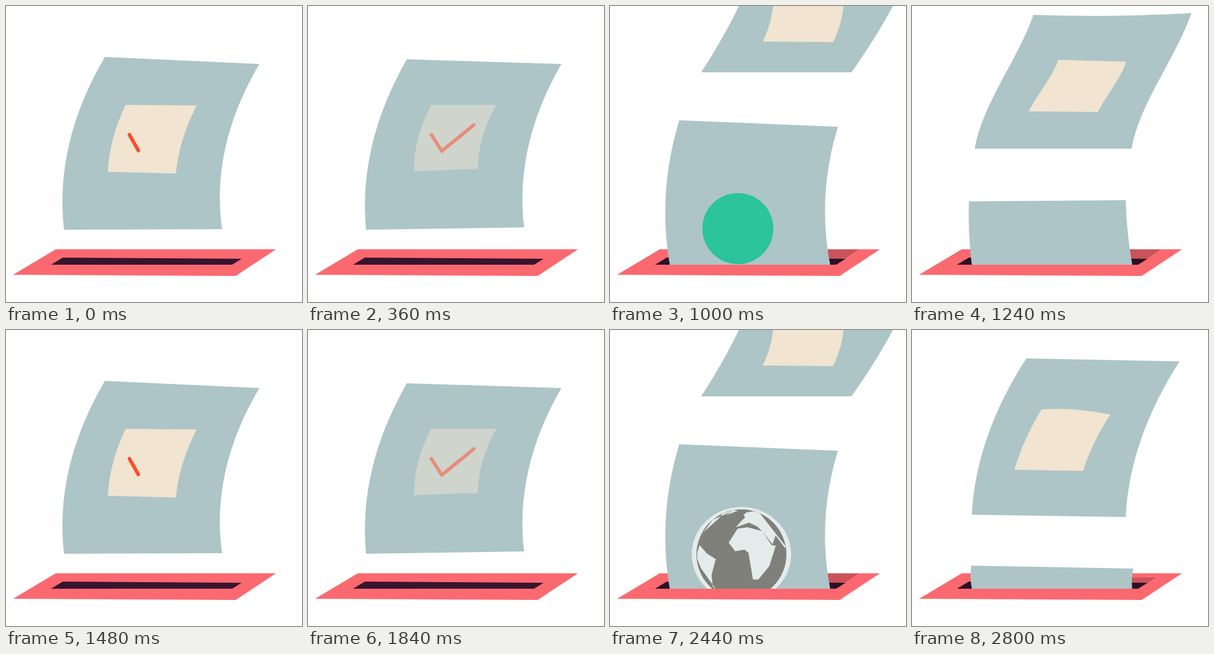
Write an HTML page with a canvas that moves like this. It is 500 by 500 pixels and loops after 2920 ms.

```html
<!DOCTYPE html>
<html lang="en">
<head>
<meta charset="utf-8">
<title>Ballots dropping into a slot</title>
<style>
html, body { margin: 0; height: 100%; overflow: hidden; background: #fff; }
canvas { display: block; width: 100vmin; height: 100vmin; }
</style>
</head>
<body>
<canvas id="stage" width="500" height="500"></canvas>
<script>
const ctx = document.getElementById('stage').getContext('2d');
const LOOP = 2920;
const COLORS = {
  paper: '#adc5c7', square: '#f1e4d1', check: '#fb4b2e', tray: '#fb6970',
  slot: '#38142f', light: '#e3eceb', ocean: '#7f8079', emblem: '#2bc49b'
};

// The drawing moves in held poses; twelve poses make one ballot.
const STARTS = [0, 120, 240, 360, 520, 600, 760, 880, 1000, 1120, 1240, 1360,
  1480, 1600, 1720, 1840, 1960, 2040, 2200, 2320, 2440, 2560, 2680, 2800];

function fill(path, color) {
  ctx.fillStyle = color;
  ctx.fill(new Path2D(path));
}

function ellipse(x, y, rx, ry, color) {
  ctx.fillStyle = color;
  ctx.beginPath();
  ctx.ellipse(x, y, rx, ry, 0, 0, 2 * Math.PI);
  ctx.fill();
}

// A sheet is four corners (clockwise from top left), the sideways bow of its
// sides, the bow of its top edge and an S-bend of its sides.
function drawSheet([ax, ay, bx, by, cx, cy, dx, dy, bow = 0, top = 0, bend = 0], color) {
  const third = (a, b) => a + (b - a) / 3;
  const upper = bow * 2 / 3 + bend, lower = bow * 2 / 3 - bend;
  fill(`M${ax},${ay} Q${(ax + bx) / 2},${(ay + by) / 2 + top} ${bx},${by}
    C${third(bx, cx) + upper},${third(by, cy)} ${third(cx, bx) + lower},${third(cy, by)} ${cx},${cy}
    L${dx},${dy}
    C${third(dx, ax) + lower},${third(dy, ay)} ${third(ax, dx) + upper},${third(ay, dy)} ${ax},${ay}Z`, color);
}

const mix = (a, b, t) => a.map((n, i) => n + (b[i] - n) * t);

// Ballot entering the slot: top corners, bows.
function enteringSheet(pose) {
  const slotEdge = [372, 437, 101, 437];
  switch (pose) {
    case 7: return [154, 109, 416, 118, 369, 408, 101, 410, -44, -9];
    case 8: return [135, 149, 401, 159, ...slotEdge, -38, -4];
    case 9: return [117, 193, 385, 204, ...slotEdge, -29];
    case 10: return [102, 261, 371, 265, ...slotEdge, -15];
    case 11: return [96, 330, 361, 328, ...slotEdge, -4];
    case 0: return [100, 398, 374, 403, ...slotEdge, -3];
  }
}

// Ballot coming down behind it, with its blank square.
function arrivingSheets(pose) {
  switch (pose) {
    case 7: return [[217, -24, 489, -24, 471, 24, 204, 17]];
    case 8: return [
      [235, -90, 505, -90, 438, 66, 180, 63],
      [290, -60, 405, -60, 398, 8, 280, 7]];
    case 9: return [
      [240, -50, 503, -50, 408, 112, 154, 112, 10],
      [276, -10, 395, -10, 377, 61, 258, 60, 8]];
    case 10: return [
      [232, -25, 502, -25, 388, 178, 128, 177],
      [264, 39, 380, 41, 342, 120, 225, 119]];
    case 11: return [
      [205, 15, 472, 12, 371, 241, 106, 241, -10, 6, 14],
      [247, 91, 362, 94, 314, 179, 197, 178, 4, 0, 4]];
    case 0: return [
      [193, 48, 452, 53, 361, 316, 101, 312, -39],
      [219, 134, 335, 143, 289, 238, 173, 236, -8, -8]];
  }
}

function drawGlobe(cx, cy, centreLon) {
  const radius = 76, rad = Math.PI / 180;
  // Coastlines as longitude, latitude pairs.
  const southAmerica = [-80, 2, -72, 12, -50, 1, -35, -6, -48, -27, -65, -45, -69, -55, -71, -18, -81, -6];
  const africa = [-17, 15, -6, 35, 10, 37, 33, 31, 43, 12, 51, 11, 40, -15, 27, -34, 18, -34, 9, 2, 4, 6, -8, 4];
  const northAmerica = [-83, 9, -97, 22, -81, 28, -56, 52, -85, 65, -70, 71, -160, 70, -125, 45, -107, 23];
  const greenland = [-45, 60, -60, 78, -18, 77];
  const eurasia = [-9, 37, 0, 48, 8, 55, 6, 61, 18, 69, 75, 73, 140, 55, 107, 10, 78, 8, 57, 25, 45, 13, 34, 29, 27, 38, 14, 45];

  ellipse(cx, cy, 84, 80, COLORS.light);
  ellipse(cx, cy, radius, radius, COLORS.ocean);
  ctx.fillStyle = COLORS.light;
  for (const land of [southAmerica, africa, northAmerica, greenland, eurasia]) {
    let visible = false;
    ctx.beginPath();
    for (let i = 0; i < land.length; i += 2) {
      const lon = (land[i] - centreLon) * rad, lat = land[i + 1] * rad;
      let x = Math.cos(lat) * Math.sin(lon), y = Math.sin(lat);
      if (Math.cos(lon) > 0) visible = true;
      else {
        // Points on the far side slide out to the rim.
        const size = Math.hypot(x, y);
        x /= size;
        y /= size;
      }
      ctx.lineTo(cx + radius * x, cy - radius * y);
    }
    if (visible) ctx.fill();
  }
}

function drawIcon(pose, isGlobe) {
  if (pose < 5) return;
  const fall = Math.max(0, pose - 6);
  const x = 240 - 6 * fall;
  const y = 235 + [0, 38, 87, 144, 203, 267][fall];
  ctx.globalAlpha = pose === 5 ? 0.5 : 1;
  if (isGlobe) drawGlobe(x, y, (pose - 9) * 20);
  else ellipse(x - 6, y - 3, 60, 60, COLORS.emblem);
  ctx.globalAlpha = 1;
}

function drawCheck(pose) {
  ctx.strokeStyle = COLORS.check;
  ctx.lineWidth = 6;
  ctx.lineCap = ctx.lineJoin = 'round';
  ctx.beginPath();
  ctx.moveTo(208.5, 217.5);
  if (pose === 1) ctx.lineTo(223.5, 244);
  else {
    ctx.lineTo(226, 245);
    if (pose === 2) ctx.lineTo(251, 225);
    else ctx.lineTo(280, 201);
  }
  ctx.stroke();
}

function shadowPath(pose, isGlobe) {
  if (pose === 7) {
    return isGlobe ? 'M125,411 H421 L410,418 H115Z' : 'M145,411 H423 L382,437 H105Z';
  }
  return pose === 0
    ? 'M101,418 H412 L382,437 H76 L96,425 H101Z'
    : 'M101,411 H420 L382,437 H76 L96,425 H101Z';
}

function drawTray() {
  fill('M84,411 L456,411 L388,456 L12,454Z', COLORS.tray);
  fill('M96,425 L398,427 L382,437 L76,437Z', COLORS.slot);
}

function drawRestingBallot(pose, isGlobe) {
  const settle = Math.min(1, (pose - 1) / 3);
  drawSheet(mix(
    [167, 86, 428, 98, 365, 377, 98, 378, -51],
    [167, 90, 428, 98, 365, 374, 98, 378, -48], settle), COLORS.paper);
  if (pose < 5) {
    ctx.globalAlpha = pose === 4 ? 0.5 : 1;
    drawSheet(mix(
      [202, 167, 322, 168, 287, 283, 172, 280, -12],
      [208, 167, 318, 167, 287, 275, 179, 279, -15], settle), COLORS.square);
    drawCheck(pose);
    ctx.globalAlpha = 1;
  }
  drawIcon(pose, isGlobe);
}

function drawMovingBallots(pose, isGlobe) {
  fill(shadowPath(pose, isGlobe), 'rgba(0,0,0,0.2)');
  const [paper, square] = arrivingSheets(pose);
  drawSheet(paper, COLORS.paper);
  if (square) drawSheet(square, COLORS.square);
  ctx.save();
  ctx.beginPath();
  ctx.rect(0, 0, 500, 437);
  ctx.clip();
  drawSheet(enteringSheet(pose), COLORS.paper);
  drawIcon(pose, isGlobe);
  ctx.restore();
}

function render(now) {
  const time = now % LOOP;
  const step = STARTS.findLastIndex(start => start <= time);
  const pose = (step + 1) % 12;
  const isGlobe = step > 11;
  ctx.fillStyle = '#fff';
  ctx.fillRect(0, 0, 500, 500);
  drawTray();
  if (pose > 6 || pose === 0) drawMovingBallots(pose, isGlobe);
  else drawRestingBallot(pose, isGlobe);
}

const began = performance.now();
function tick() {
  render(performance.now() - began);
  requestAnimationFrame(tick);
}
tick();
</script>
</body>
</html>
```
